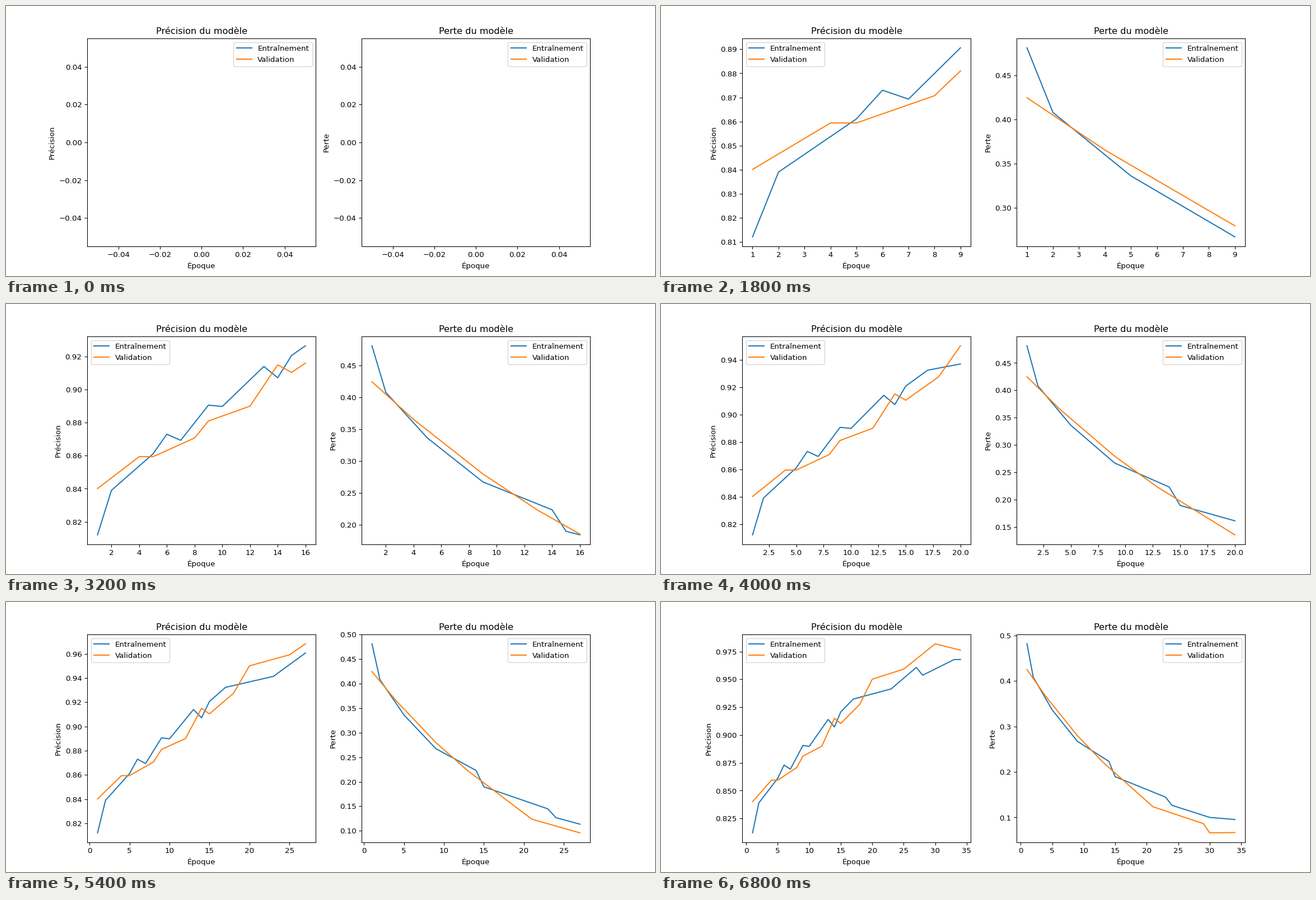
Animation of 1159x483 px, one loop 7 s. Source, as a matplotlib script:

```python
import numpy as np
import matplotlib.pyplot as plt
from matplotlib.animation import FuncAnimation

EPOCHS = 34
STEP_MS = 200
DPI = 96.61  # 12 x 5 inches come to 1159 x 483 pixels

epochs = np.arange(1, EPOCHS + 1)


def curve(*turns):
    """One value per epoch, straight between the (epoch, value) turns."""
    return np.interp(epochs, *zip(*turns))


accuracy = {
    "Entraînement": curve(
        (1, .8121), (2, .839), (5, .8611), (6, .873), (7, .8693),
        (9, .8906), (10, .8898), (13, .914), (14, .9072), (15, .9207),
        (17, .9323), (23, .9414), (27, .9607), (28, .9537), (33, .9678)),
    "Validation": curve(
        (1, .8401), (4, .8594), (5, .8594), (8, .8707), (9, .881),
        (12, .89), (14, .915), (15, .9104), (18, .9274), (20, .9501),
        (25, .9592), (30, .9819), (34, .9762)),
}
loss = {
    "Entraînement": curve(
        (1, .4813), (2, .4081), (5, .3363), (9, .2673), (14, .2233),
        (15, .1896), (23, .1447), (24, .1268), (30, .1002), (34, .0956)),
    "Validation": curve(
        (1, .4248), (4, .3656), (9, .2798), (13, .2222),
        (21, .1236), (29, .0865), (30, .0663), (34, .0669)),
}

fig, axes = plt.subplots(1, 2, figsize=(12, 5), dpi=DPI)


def draw_panel(ax, n, name, history):
    ax.clear()
    for label, values in history.items():
        ax.plot(epochs[:n], values[:n], label=label)
    ax.set_title(f"{name} du modèle")
    ax.set_xlabel("Époque")
    ax.set_ylabel(name)
    ax.legend()


def update(n):
    draw_panel(axes[0], n, "Précision", accuracy)
    draw_panel(axes[1], n, "Perte", loss)


anim = FuncAnimation(fig, update, frames=EPOCHS + 1, interval=STEP_MS,
                     repeat=True, repeat_delay=0)
plt.show()
```
